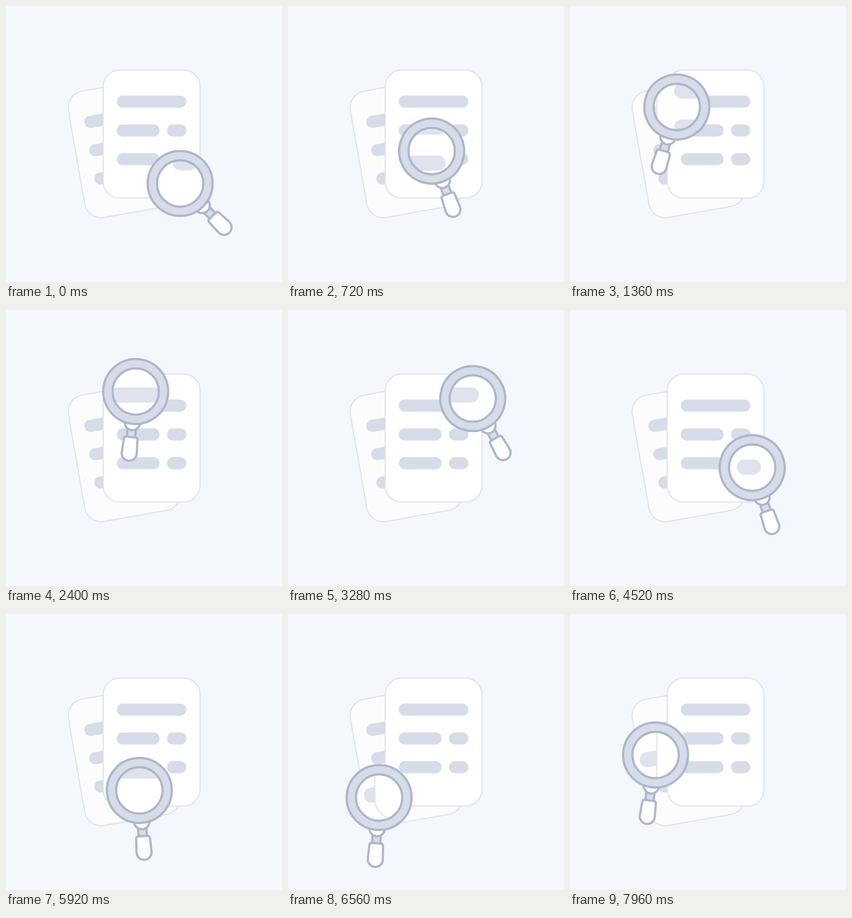
An HTML page that plays this animation: 500 by 500 pixels, repeating every 8000 ms.

```html
<!DOCTYPE html>
<html lang="en">
<head>
<meta charset="utf-8">
<title>Document search</title>
<style>
  html, body { margin: 0; width: 100%; height: 100%; overflow: hidden; background: #f4f7fb; }
  svg { display: block; width: 100%; height: 100%; }
  .bar { fill: #d6dce8; }
  .edge { stroke: #aeb6c9; stroke-width: 4; }
</style>
</head>
<body>
<svg viewBox="0 0 500 500">
  <defs>
    <!-- One sheet, centred on its own middle -->
    <g id="sheet">
      <rect x="-87.75" y="-116" width="175.5" height="232" rx="30" stroke="#dfe2ec" stroke-width="2"/>
      <g class="bar">
        <rect x="-63" y="-69.8" width="126" height="22" rx="11"/>
        <rect x="-63" y="-17.6" width="77.5" height="22" rx="11"/>
        <rect x="28" y="-17.6" width="35" height="22" rx="11"/>
        <rect x="-63" y="34.5" width="77.5" height="22" rx="11"/>
        <rect x="28" y="34.5" width="35" height="22" rx="11"/>
      </g>
    </g>
    <g id="papers">
      <use href="#sheet" fill="#fcfcfd" transform="translate(214.3 258.7) rotate(-10)"/>
      <use href="#sheet" fill="#fff" transform="translate(263.75 232)"/>
    </g>
    <clipPath id="glass"><circle id="hole" r="42"/></clipPath>
  </defs>

  <use href="#papers"/>

  <g id="grip">
    <rect class="bar edge" x="-7.5" y="62" width="15" height="26"/>
    <circle class="edge" cy="56.5" r="13.8" fill="#fff"/>
    <path class="edge" fill="#fff" d="M-8 83H8Q12.5 83 12.5 88L13.6 112.4A13.6 13.6 0 0 1 -13.6 112.4L-12.5 88Q-12.5 83 -8 83Z"/>
    <circle class="bar edge" r="58.8"/>
  </g>

  <g clip-path="url(#glass)">
    <rect width="500" height="500" fill="#f4f7fb"/>
    <use href="#papers" transform="translate(-62.5 -62.5) scale(1.25)"/>
    <rect width="500" height="500" fill="#fff" opacity=".2"/>
  </g>
  <circle id="rim" class="edge" r="42" fill="none"/>
</svg>
<script>
  const LOOP = 8000;

  // Resting poses: lens x, lens y, handle angle
  const lowerRight = [315.5, 321.5, -45];
  const upperLeft = [186, 165, 28];
  const upperRight = [345, 165, -36];
  const right = [325.5, 305.5, -13];
  const lowerLeft = [165, 332.5, 3.5];
  const left = [148.8, 207.7, 10.3];

  // Each move follows a Bezier curve through its poses, then holds
  const moves = [
    { from: 0, to: 1800, path: [lowerRight, [296, 293, -29], [197, 211, -5], upperLeft] },
    { from: 1800, to: 3560, path: [upperLeft, [234, 142, -6], [279, 134, 9], upperRight] },
    { from: 3560, to: 4860, path: [upperRight, [359, 226, -29], [335, 254, -28], right] },
    { from: 5360, to: 6560, path: [right, lowerLeft] },
    { from: 7320, to: 8520, path: [lowerLeft, left] }
  ];

  // Ease in and out, a little quicker at the start
  function ease(u) {
    const s = u ** 0.87;
    return s * s * (3 - 2 * s);
  }

  const mix = (a, b, f) => a.map((v, i) => v + (b[i] - v) * f);

  function along(path, f) {
    while (path.length > 1) path = path.slice(1).map((p, i) => mix(path[i], p, f));
    return path[0];
  }

  function pose(t) {
    const { from, to, path } = moves.findLast(m => m.from <= t);
    return along(path, ease(Math.min((t - from) / (to - from), 1)));
  }

  const [grip, hole, rim] = ['grip', 'hole', 'rim'].map(id => document.getElementById(id));

  function draw(t) {
    const [x, y, angle] = pose(t);
    grip.setAttribute('transform', `translate(${x} ${y}) rotate(${angle})`);
    for (const circle of [hole, rim]) {
      circle.setAttribute('cx', x);
      circle.setAttribute('cy', y);
    }
  }

  let start;
  function tick(now) {
    start ??= now;
    draw((now - start) % LOOP);
    requestAnimationFrame(tick);
  }
  draw(0);
  requestAnimationFrame(tick);
</script>
</body>
</html>
```
